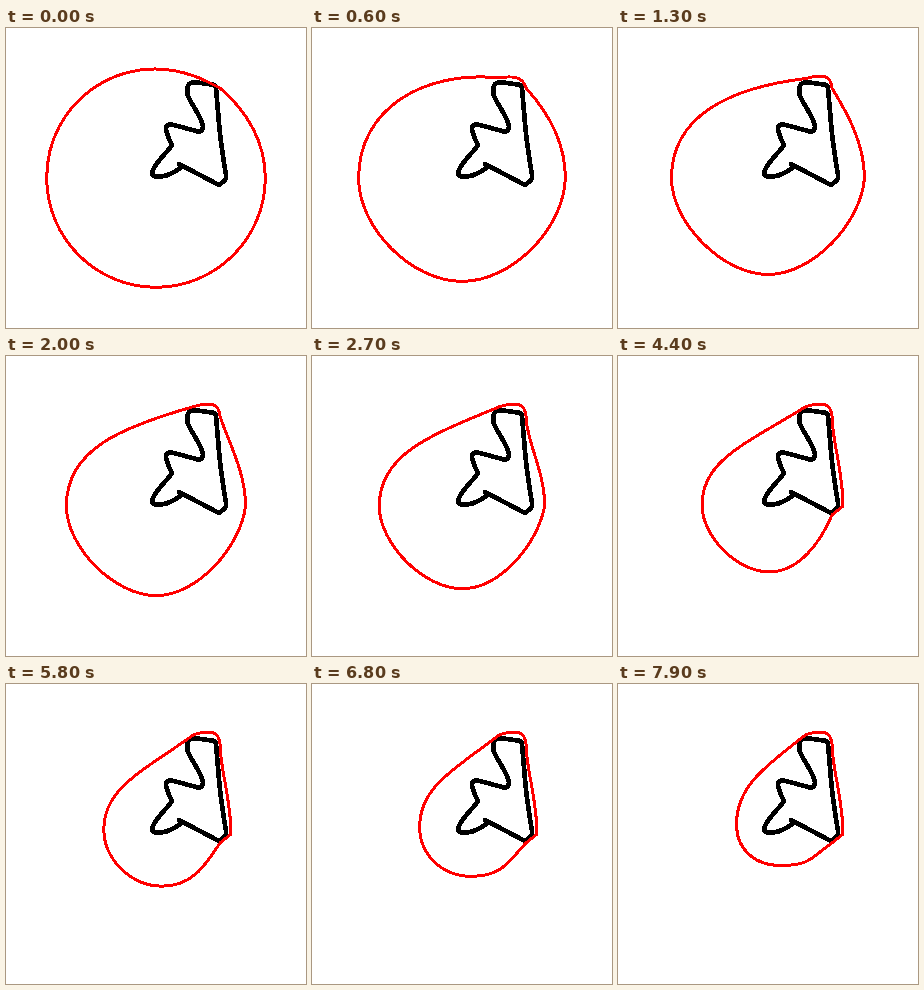
Recreate the animation shown at these times as an HTML page. Size 300 by 300 pixels, loop 8000 ms.

```html
<!DOCTYPE html>
<html lang="en">
<head>
<meta charset="utf-8">
<title>Shrinking contour</title>
<style>
html, body { margin: 0; width: 100%; height: 100%; overflow: hidden; background: #fff; }
svg { display: block; width: 100vw; height: 100vh; }
path { fill: none; stroke-linecap: round; stroke-linejoin: round; shape-rendering: crispEdges; }
</style>
</head>
<body>
<svg viewBox="0 0 300 300">
  <path stroke="#000" stroke-width="4.7" d="M173 136L213 157L218 153Q220.500 151 220 147Q215 118 213 95L210 60Q210 57 206 56.500L191 54.500Q182 53.500 181.500 60V67C184 74 196 90 197 98Q197 105 190 103L168 97Q160 95 160 101C161 108 164 113 166 117C162 124 147 136 146 145C146 151 160 149 168 144L176 139"/>
  <path id="snake" stroke="#f00" stroke-width="3"/>
</svg>
<script>
const STEP = 100, STEPS = 80, CENTER = 150;

const clamp = v => Math.max(0, Math.min(1, v));
const add = (p, dx, dy) => [p[0] + dx, p[1] + dy];
const mix = (p, q, k) => p.map((v, i) => v + (q[i] - v) * k);
const curve = (...points) => "C" + points.join(" ");

// A shrinking circle that gets caught on the obstacle's top and right corner.
function contour(n) {
  const r = 109.3 - 0.985 * n;
  const late = Math.max(0, n - 40);
  const round = 0.46 + 0.09 * Math.exp(-n / 5) + 0.0037 * late;
  const grip = clamp(n / 8);

  // Free extremes
  const left = [CENTER - r, CENTER - 0.25 * late];
  const bottom = [CENTER + 0.33 * late, CENTER + r];

  // Points held by the obstacle
  const right = [CENTER + Math.max(r, 75), CENTER];
  const heel = mix(right, [214, 159], clamp((n - 35) / 8));
  const shoulder = [214, 60];
  const top = mix([188, 48], [188, 50.5], grip);

  // The pull at the top turns from the circle's tangent to a steep slope
  const angle = (40 - 60 * Math.exp(-n / 22)) * Math.PI / 180;
  const pull = 78 - 0.0045 * n * n;

  return "M" + top +
    curve(add(top, -pull * Math.cos(angle), pull * Math.sin(angle)),
          add(left, 0, -36 - 40 * Math.exp(-n / 30)), left) +
    curve(add(left, 0, round * (bottom[1] - left[1])),
          add(bottom, -round * (bottom[0] - left[0]), 0), bottom) +
    curve(add(bottom, round * (heel[0] - bottom[0]), 0),
          add(heel, -0.26 * n, round * (bottom[1] - heel[1])), heel) +
    "L" + right +
    curve(add(right, 0, -35),
          add(shoulder, 28 * clamp(1 - n / 27), 24), shoulder) +
    curve(mix([206, 56], [213, 47], grip), mix([197, 51], [204, 46], grip), top) + "Z";
}

const snake = document.getElementById("snake");
function draw(now) {
  const step = Math.floor(now / STEP) % STEPS;
  snake.setAttribute("d", contour(step));
  requestAnimationFrame(() => draw(performance.now()));
}
draw(0);
</script>
</body>
</html>
```
